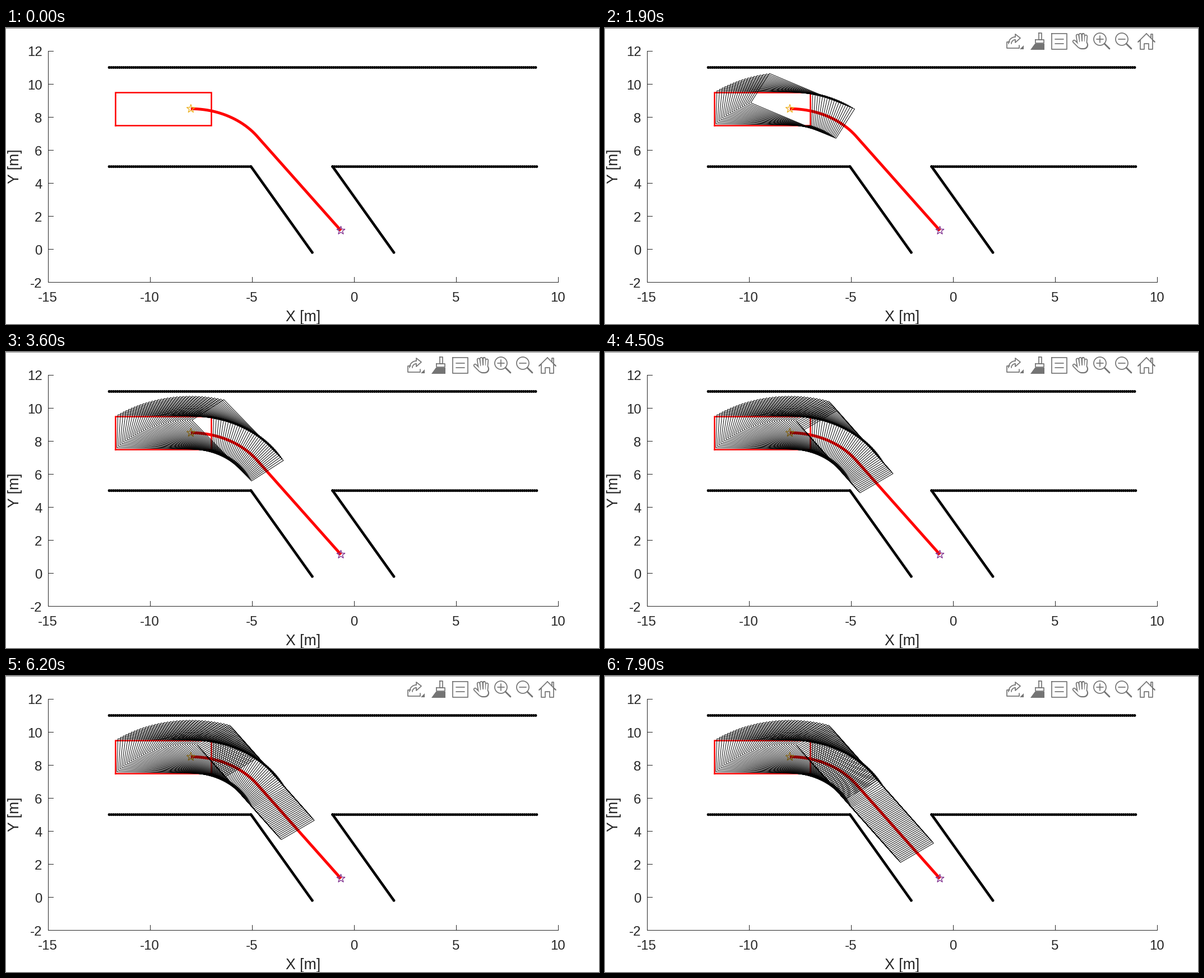
Animation, 1058 px wide and 529 px high, one loop 8 s. Source, as a matplotlib script:

```python
import numpy as np
import matplotlib.pyplot as plt
from matplotlib.animation import FuncAnimation
from matplotlib.collections import LineCollection, PatchCollection
from matplotlib.patches import Circle, Polygon

W, H, DPI = 1058, 529, 64
PX = 72 / DPI                      # points per pixel
INK, ICON = "#262626", "#747474"
FRAMES, STEP = 80, 0.1

# Route: right-hand arc, then a straight line to the goal
START = np.array([-8.0, 8.5])
RADIUS, TURN = 4.0, np.radians(54.25)
ARC = RADIUS * TURN
LENGTH = ARC + 7.03
BACK, FRONT, HALF = -3.7, 1.0, 1.0

plt.rcParams["font.family"] = "Liberation Sans"
fig = plt.figure(figsize=(W / DPI, H / DPI), dpi=DPI, facecolor="white")
ax = fig.add_axes([0, 0, 1, 1])
ax.set_xlim(0, W)
ax.set_ylim(H, 0)
ax.axis("off")


def to_px(points):
    p = np.asarray(points, float)
    return np.stack([75 + 36.4 * (p[..., 0] + 15),
                     41 + 29.53 * (12 - p[..., 1])], axis=-1)


def pose(s):
    a = min(s, ARC) / RADIUS
    rest = max(s - ARC, 0)
    x = START[0] + RADIUS * np.sin(a) + rest * np.cos(a)
    y = START[1] - RADIUS * (1 - np.cos(a)) - rest * np.sin(a)
    return np.array([x, y]), a


def car(s):
    pos, a = pose(s)
    ahead = np.array([np.cos(a), -np.sin(a)])
    left = np.array([np.sin(a), np.cos(a)])
    local = [(BACK, -HALF), (FRONT, -HALF), (FRONT, HALF), (BACK, HALF), (BACK, -HALF)]
    return to_px([pos + u * ahead + v * left for u, v in local])


def line(points, color=INK, width=1.0, **kw):
    p = np.asarray(points, float)
    return ax.plot(p[:, 0], p[:, 1], color=color, lw=width * PX, **kw)[0]


def text(x, y, s, size, **kw):
    ax.text(x, y, s, fontsize=size * PX, color=INK, va="baseline", **kw)


def draw_axes():
    line([(-1, 0), (W, 0)], "#8c8c8c")
    line([(75, 41), (75, 454), (985, 454)], solid_joinstyle="miter")
    for v in range(-15, 11, 5):
        x = to_px((v, 0))[0]
        line([(x, 454), (x, 445)])
        text(x - 0.5, 489, str(v), 24, ha="center")
    for v in range(-2, 13, 2):
        y = to_px((0, v))[1]
        line([(75, y), (84, y)])
        text(64.5, y + 9.5, str(v), 24, ha="right")
    text(530, 524, "X [m]", 26.6, ha="center")
    text(23, 247, "Y [m]", 26.6, ha="center", rotation=90, rotation_mode="anchor")


def wall(a, b, n):
    dots = [Circle(p, 2.5) for p in to_px(np.linspace(a, b, n))]
    ax.add_collection(PatchCollection(dots, facecolor="black", linewidth=0),
                      autolim=False)


def star(center, color):
    cx, cy = to_px(center)
    a = np.arange(10) * np.pi / 5
    r = np.where(np.arange(10) % 2 == 0, 7.9, 3.0)
    pts = np.stack([cx + r * np.sin(a), cy - r * np.cos(a)], axis=1)
    ax.add_patch(Polygon(pts, fill=False, ec=color, lw=1.3 * PX, zorder=4))


def draw_scene():
    wall((-12, 11), (8.9, 11), 210)
    wall((-12, 5), (-5.1, 5), 70)
    wall((-1.05, 5), (8.95, 5), 101)
    drop = 3 * np.tan(np.pi / 3)
    for x in (-5.05, -1.05):
        wall((x, 5), (x + 3, 5 - drop), 61)
    line(car(0), "red", 2.5, solid_joinstyle="miter", zorder=3)
    route = to_px([pose(s)[0] for s in np.linspace(0, LENGTH, 200)])
    line(route, "red", 5, solid_capstyle="butt", zorder=3)
    star(START, "#edb120")
    star(pose(LENGTH)[0], "#7e2f8e")


def draw_toolbar():
    parts = []

    def stroke(pts, width=1.7, color=ICON):
        parts.append(line(pts, color, width, solid_joinstyle="round",
                          solid_capstyle="round"))

    def box(x, y, w, h):
        stroke([(x, y), (x + w, y), (x + w, y + h), (x, y + h), (x, y)])

    def solid(pts):
        parts.append(ax.add_patch(Polygon(pts, fc=ICON, lw=0)))

    # export: tray, bent arrow, menu corner
    stroke([(722, 25), (717, 25), (717, 36), (739, 36), (739, 31)])
    bend = np.linspace(0, np.pi / 2, 12)
    for r in (7, 12):
        stroke(np.stack([732 - r * np.cos(bend), 28 - r * np.sin(bend)], axis=1))
    stroke([(732, 16), (732, 11), (741, 18), (732, 26), (732, 21)])
    solid([(747, 31), (747, 38), (740, 38)])

    # brush
    box(774, 9, 5, 12)
    box(768, 21, 15, 6)
    solid([(767, 28), (784, 28), (784, 39), (759, 39)])

    # data tip
    box(797, 10, 27, 28)
    for y in (20, 28):
        stroke([(803, y), (818, y)])

    # hand: pale strokes over slightly wider grey ones
    for color, extra in ((ICON, 3.4), ("white", 0)):
        for i in range(4):
            stroke([(843 + 5 * i, 12 + (i - 1.3) ** 2), (845 + 4 * i, 27)],
                   3 + extra, color)
        stroke([(837, 24), (846, 33)], 3 + extra, color)
        stroke([(850, 30), (854, 30)], 12 + extra, color)

    # zoom in, zoom out
    for cx in (883, 922):
        parts.append(ax.add_patch(Circle((cx, 20), 11, fill=False, ec=ICON,
                                         lw=1.7 * PX)))
        stroke([(cx + 8, 28), (cx + 17, 37)], 2.8)
        stroke([(cx - 6, 20), (cx + 6, 20)])
    stroke([(883, 14), (883, 26)])

    # home
    for side in (-1, 1):
        shape = [(0, 10), (15, 25), (11, 22), (11, 38), (4, 38), (4, 28), (0, 28)]
        stroke([(966 + side * u, y) for u, y in shape])
    stroke([(974, 17), (974, 11), (977, 11), (977, 20)])
    return parts


draw_axes()
draw_scene()
toolbar = draw_toolbar()
boxes = [car(k * STEP) for k in range(1, FRAMES)]
trail = LineCollection([], colors="black", linewidths=0.95 * PX, zorder=5)
ax.add_collection(trail, autolim=False)


def update(k):
    trail.set_segments(boxes[:k])
    for part in toolbar:
        part.set_visible(k > 0)
    return [trail, *toolbar]


anim = FuncAnimation(fig, update, frames=FRAMES, init_func=lambda: update(0),
                     interval=100, repeat=True, repeat_delay=0, blit=False)
plt.show()
```
